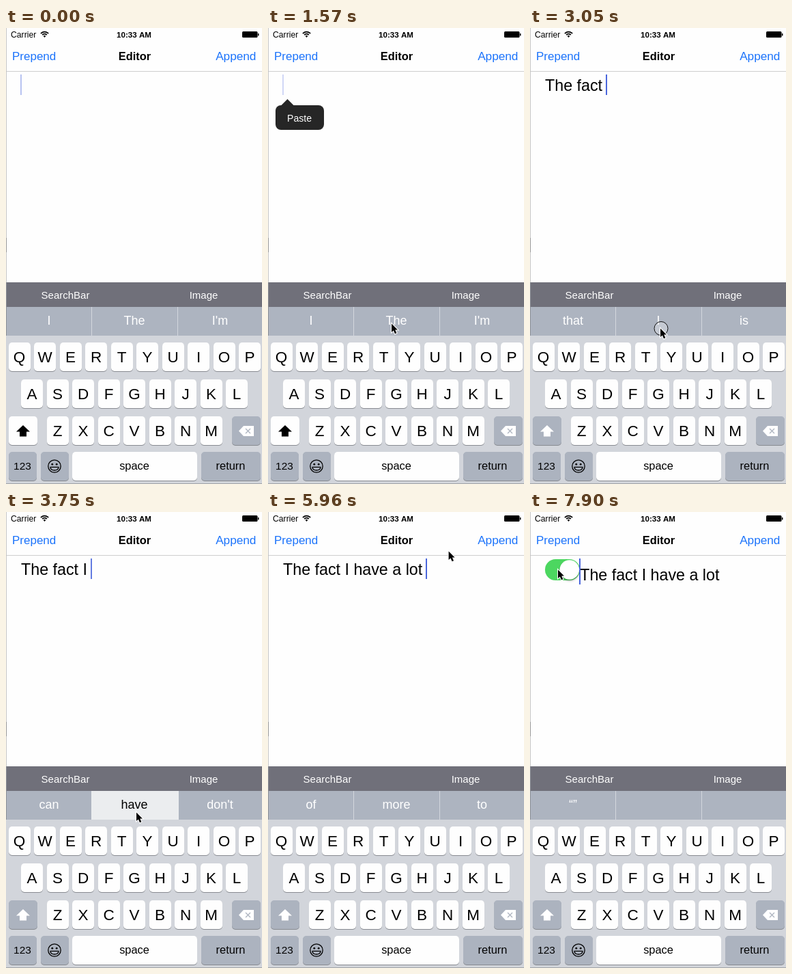
Recreate the animation shown at these times as an HTML page with a canvas. Size 375x667 px, loop 7990 ms.

```html
<!DOCTYPE html>
<html lang="en">
<head>
<meta charset="utf-8">
<title>Editor</title>
<style>
html, body { margin: 0; width: 100%; height: 100%; overflow: hidden; background: #fff; }
canvas { display: block; width: 375px; height: 667px; }
</style>
</head>
<body>
<canvas id="stage"></canvas>
<script>
const W = 375, H = 667, LOOP = 7990;
const canvas = document.getElementById('stage');
const dpr = window.devicePixelRatio || 1;
canvas.width = W * dpr;
canvas.height = H * dpr;
const ctx = canvas.getContext('2d');
ctx.scale(dpr, dpr);

const FAMILY = '"Liberation Sans", Arial, sans-serif';
const BLUE = '#1b73fb', CARET = '#4a66dc', GREY_KEY = '#acb3bf', KEYBOARD = '#d2d5db';
const INSERT = 6760;

// Each step: time, typed text, suggestions, tapped cell
const steps = [
  [0, '', ['I', 'The', "I'm"]],
  [2030, 'The ', ['first', 'fact', 'best'], 1],
  [2640, 'The fact ', ['that', 'I', 'is'], 1],
  [3230, 'The fact I ', ['can', 'have', "don't"], 1],
  [3870, 'The fact I have ', ['to', 'a', 'been'], 1],
  [4250, 'The fact I have a ', ['great', 'good', 'lot'], 1],
  [4720, 'The fact I have a lot ', ['of', 'more', 'to'], 2],
  [INSERT, 'The fact I have a lot ', ['\u201c\u201d', '', '']]
];

// Pointer path: time, x, y
const path = [
  [350, 340, 667], [580, 220, 330], [860, 26, 84], [1050, 26, 84],
  [1300, 160, 395], [1420, 202, 440], [1540, 180, 431], [2100, 180, 431],
  [2360, 190, 438], [4260, 190, 438], [4440, 304, 435], [4740, 304, 435],
  [5250, 322, 38], [5510, 326, 38], [5690, 325, 40], [5960, 264, 56],
  [6400, 56, 40], [6490, 45, 38], [6780, 45, 38], [7140, 40, 83], [7990, 40, 83]
];

const clamp = v => Math.max(0, Math.min(1, v));
const smooth = v => { v = clamp(v); return v * v * (3 - 2 * v); };

function pointerAt(t) {
  let i = 0;
  while (i < path.length - 2 && path[i + 1][0] <= t) i++;
  const a = path[i], b = path[i + 1], d = b[0] - a[0];
  const u = clamp((t - a[0]) / d);
  const slope = (j, k) => {
    const p = path[j - 1], q = path[j], r = path[j + 1];
    if (!p || !r) return 0;
    const before = q[k] - p[k], after = r[k] - q[k];
    return before * after <= 0 ? 0 : (before + after) / (r[0] - p[0]);
  };
  return [1, 2].map(k => {
    const m = slope(i, k) * d, n = slope(i + 1, k) * d, e = smooth(u);
    return a[k] * (1 - e) + b[k] * e + u * (1 - u) * ((1 - u) * m - u * n);
  });
}

function rect(x, y, w, h, color) {
  ctx.fillStyle = color;
  ctx.fillRect(x, y, w, h);
}

function round(x, y, w, h, r, color) {
  ctx.fillStyle = color;
  ctx.beginPath();
  ctx.roundRect(x, y, w, h, r);
  ctx.fill();
}

function text(s, x, y, size, color, align = 'center', weight = '') {
  ctx.font = `${weight} ${size}px ${FAMILY}`;
  ctx.textAlign = align;
  ctx.fillStyle = color;
  ctx.fillText(s, x, y);
}

function poly(points, color) {
  ctx.fillStyle = color;
  ctx.beginPath();
  points.forEach(([x, y]) => ctx.lineTo(x, y));
  ctx.closePath();
  ctx.fill();
}

function disc(x, y, r, color) {
  ctx.fillStyle = color;
  ctx.beginPath();
  ctx.arc(x, y, r, 0, 7);
  ctx.fill();
}

function key(x, y, w, color = '#fefefe') {
  round(x, y + 1, w, 42, 5, '#888b91');
  round(x, y, w, 42, 5, color);
}

function header(t) {
  text('Carrier', 7, 14, 12.2, '#000', 'left');
  ctx.strokeStyle = '#000';
  ctx.lineWidth = 1.7;
  for (const r of [4.4, 7.4]) {
    ctx.beginPath();
    ctx.arc(56.5, 13, r, -Math.PI * 0.77, -Math.PI * 0.23);
    ctx.stroke();
  }
  ctx.fillStyle = '#000';
  ctx.beginPath();
  ctx.moveTo(56.5, 14);
  ctx.arc(56.5, 13, 2.2, -Math.PI * 0.8, -Math.PI * 0.2);
  ctx.fill();
  text('10:33 AM', 187.5, 14, 11.6, '#000', 'center', 'bold');
  round(346, 5, 22.5, 9, 1.5, '#000');
  rect(369, 8, 1.4, 3.4, '#000');

  ctx.globalAlpha = t > 6560 && t < INSERT ? 0.3 : 1;
  text('Prepend', 9, 47, 17, BLUE, 'left');
  ctx.globalAlpha = 1;
  text('Editor', 188.5, 47, 16.4, '#000', 'center', 'bold');
  text('Append', 366.4, 47, 17.2, BLUE, 'right');
  rect(0, 63, W, 1, '#cfcfcf');
  rect(0, 0, 1, 372, '#c6c6c6');
  rect(0, 307, 1, 21, '#999');
}

function caretAlpha(t, typed) {
  let start = -590;
  if (t >= 960) start = 960;
  if (typed >= 2030) start = typed;
  const p = (t - start) % 1000;
  if (p < 500) return 1;
  return p < 650 ? 1 - (p - 500) / 150 : clamp((p - 900) / 100);
}

function toggle(t) {
  const on = smooth((t - 7440) / 260);
  round(22, 69, 51, 31, 15.5, '#e3e3e3');
  const inset = 1.5 * (1 - on);
  round(22 + inset, 69 + inset, 51 - 2 * inset, 31 - 2 * inset, 15.5 - inset, '#fff');
  ctx.globalAlpha = on;
  round(22, 69, 51, 31, 15.5, '#4cd760');
  ctx.globalAlpha = 1;
  ctx.save();
  ctx.shadowColor = 'rgba(0,0,0,.3)';
  ctx.shadowBlur = 3 * dpr;
  ctx.shadowOffsetY = 2 * dpr;
  disc(37.5 + 20.3 * on, 84.5, 14.3, '#fff');
  ctx.restore();
}

function editor(t, step) {
  const added = t >= INSERT;
  if (added) toggle(t);
  const x = added ? 73.2 : 22;
  text(step[1], x, added ? 100 : 92, 23.25, '#000', 'left');
  const end = added ? 72 : step[1] ? x + ctx.measureText(step[1]).width - 1.2 : 21;
  ctx.globalAlpha = caretAlpha(t, step[0]);
  rect(Math.round(end), 68, 2, added ? 38 : 30, CARET);
  ctx.globalAlpha = 1;

  if (t >= 1050 && t < 1910) {
    ctx.globalAlpha = clamp((t - 1030) / 120) * clamp((1910 - t) / 80);
    poly([[28.5, 104], [38, 113.5], [19, 113.5]], '#262626');
    round(11, 113, 71, 36, 8, '#262626');
    text('Paste', 46, 136.5, 14.1, '#fff');
    ctx.globalAlpha = 1;
  }
}

function suggestions(t, step) {
  rect(1, 372, W, 36, '#70707a');
  text('SearchBar', 87, 395.5, 15, '#fff');
  text('Image', 289.5, 395.5, 15, '#fff');
  rect(1, 408, W, 42, '#adb4c0');
  rect(125, 408, 1, 42, '#d3d7dd');
  rect(251, 408, 1, 42, '#d3d7dd');
  const tap = steps.find(s => s[3] && t >= s[0] - 130 && t < s[0]);
  [63, 188, 313.5].forEach((x, i) => {
    const lit = tap && tap[3] === i;
    if (lit) rect(i * 126 - 1, 408, 128, 42, '#ebedef');
    text(step[2][i], x, 433.5, 18, lit ? '#000' : '#fff');
  });
  rect(0, 372, 1, 78, '#90939a');
}

function keyboard(t) {
  rect(0, 450, W, 217, KEYBOARD);
  rect(0, 666, W, 1, '#a2a4a8');
  const rows = [['QWERTYUIOP', 4, 460], ['ASDFGHJKL', 22.5, 514], ['ZXCVBNM', 60, 568]];
  for (const [letters, x, y] of rows) {
    [...letters].forEach((c, i) => {
      const left = x + i * 37.5;
      key(Math.floor(left), y, 32);
      text(c, left + 15.6, y + 29, 22.5, '#000');
    });
  }

  const shift = t < 2030;
  key(4, 568, 42, shift ? '#fefefe' : GREY_KEY);
  poly([[25, 581], [35, 590.5], [30, 590.5], [30, 597.5], [20, 597.5], [20, 590.5], [15, 590.5]],
    shift ? '#000' : '#fff');

  key(331, 568, 42, GREY_KEY);
  poly([[341, 589.5], [348, 582], [363, 582], [363, 597], [348, 597]], '#fff');
  ctx.strokeStyle = GREY_KEY;
  ctx.lineWidth = 1.3;
  ctx.beginPath();
  ctx.moveTo(351, 586);
  ctx.lineTo(358, 593);
  ctx.moveTo(358, 586);
  ctx.lineTo(351, 593);
  ctx.stroke();

  key(4, 620, 41, GREY_KEY);
  text('123', 24, 646, 15.5, '#000');
  key(51, 620, 41, GREY_KEY);
  smiley(71, 641);
  key(97, 620, 183);
  text('space', 188, 646, 16.4, '#000');
  key(286, 620, 87, GREY_KEY);
  text('return', 329, 646, 16.4, '#000');
}

function smiley(x, y) {
  ctx.strokeStyle = '#000';
  ctx.lineWidth = 1.3;
  ctx.beginPath();
  ctx.arc(x, y, 9.2, 0, 7);
  ctx.stroke();
  for (const side of [-3.2, 3.2]) disc(x + side, y - 2.8, 1.4, '#000');
  ctx.beginPath();
  ctx.ellipse(x, y + 1.4, 6, 4.6, 0, 0, Math.PI);
  ctx.closePath();
  ctx.stroke();
}

function pointer(t) {
  if (t < 350) return;
  const [x, y] = pointerAt(t);
  const downs = steps.filter(s => s[3]).map(s => s[0] - 200).concat(870, 6490, 7360);
  if (downs.some(d => t >= d && t < d + 75)) {
    disc(x + 2, y + 1.5, 10, 'rgba(255,255,255,.3)');
    ctx.strokeStyle = '#111';
    ctx.lineWidth = 1;
    ctx.stroke();
  }
  ctx.save();
  ctx.translate(x + 1, y + 1.5);
  ctx.scale(0.86, 0.86);
  ctx.beginPath();
  [[0, 0], [0, 14.5], [3.3, 11.5], [5.8, 17.2], [8.6, 16], [6.1, 10.4], [10.4, 10.4]]
    .forEach(p => ctx.lineTo(...p));
  ctx.closePath();
  ctx.lineJoin = 'miter';
  ctx.lineWidth = 2.4;
  ctx.strokeStyle = '#fff';
  ctx.stroke();
  ctx.fillStyle = '#000';
  ctx.fill();
  ctx.restore();
}

function draw(now) {
  const t = now % LOOP;
  const step = steps.filter(s => s[0] <= t).pop();
  rect(0, 0, W, H, '#fefefe');
  header(t);
  editor(t, step);
  suggestions(t, step);
  keyboard(t);
  pointer(t);
}

const begin = performance.now();
function frame() {
  draw(performance.now() - begin);
  requestAnimationFrame(frame);
}
frame();
</script>
</body>
</html>
```
